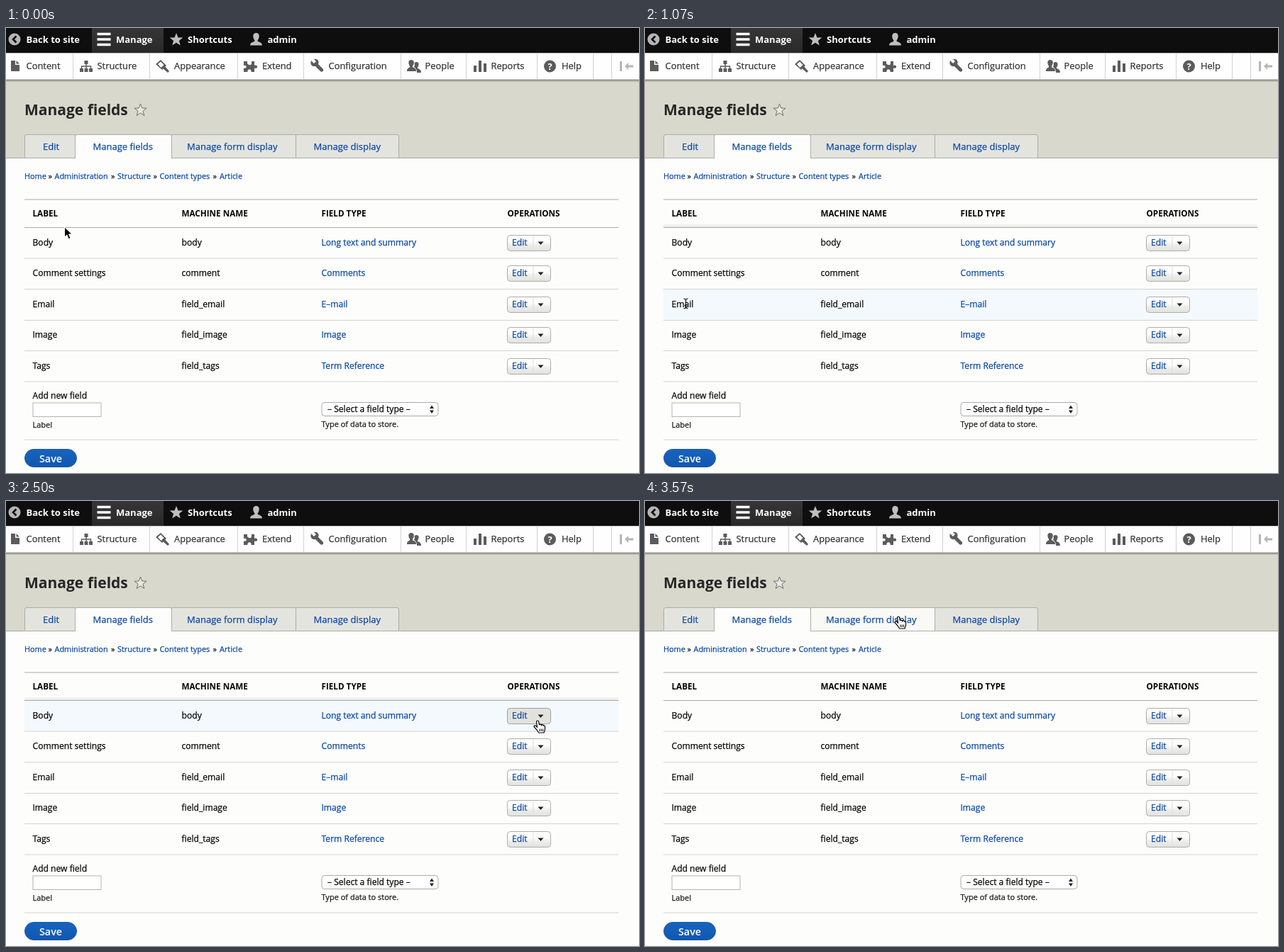
An HTML page that plays this animation: 892 by 628 pixels, repeating every 8 s.

```html
<!DOCTYPE html>
<html lang="en">
<head>
<meta charset="utf-8">
<title>Manage fields</title>
<style>
  html, body { margin: 0; width: 100%; height: 100%; overflow: hidden; background: #fdfdfc; }
  svg { display: block; width: 892px; height: 628px; }
  text {
    font: 12.1px "Open Sans", "Noto Sans", sans-serif;
    color: #060606; fill: currentColor; stroke: currentColor; stroke-width: .25px;
    white-space: pre;
  }
  .bar, .title, .head, .save { stroke: none; }
  .bar { font-size: 13px; font-weight: 700; color: #fff; }
  .tray { font-size: 12.9px; color: #333; }
  .title { font-size: 21px; font-weight: 700; color: #262626; }
  .tab { font-size: 13px; color: #0a48a3; }
  .crumb { font-size: 10.9px; color: #0a48a3; }
  .sep, .note { font-size: 11px; color: #1a1a1a; }
  .head { font-size: 11.7px; font-weight: 700; }
  .link { color: #0a48a3; }
  .save { font-size: 14.3px; font-weight: 600; color: #fff; }
  .icon { fill: #5b5b5b; }
  .button rect { fill: url(#button); stroke: #adada8; }
  .button.pale rect { stroke: #d2d2cc; }
  .button.hover rect { fill: #e3e3de; stroke: #a0a09b; }
</style>
</head>
<body>
<svg viewBox="0 0 892 628">
  <defs>
    <linearGradient id="button" x2="0" y2="1">
      <stop offset=".4" stop-color="#fdfdfc"/><stop offset=".65" stop-color="#ececea"/><stop offset="1" stop-color="#e2e2de"/>
    </linearGradient>
    <linearGradient id="active" x2="0" y2="1">
      <stop stop-color="#363636"/><stop offset="1" stop-color="#292929"/>
    </linearGradient>
    <linearGradient id="shadow" x2="0" y2="1">
      <stop stop-color="#8f8f8b"/><stop offset=".4" stop-color="#9c9c96"/><stop offset="1" stop-color="#d8d8cc"/>
    </linearGradient>
    <linearGradient id="blue" x2="0" y2="1">
      <stop stop-color="#1764bf"/><stop offset="1" stop-color="#1256b0"/>
    </linearGradient>
  </defs>

  <!-- Top bar -->
  <rect width="892" height="35.500" fill="#0e0e0e"/>
  <rect x="121" width="101" height="35" fill="url(#active)"/>
  <circle cx="12" cy="16" r="8.500" fill="#b5b5b5"/>
  <path d="M14.500 11.500 10 16l4.500 4.500" fill="none" stroke="#0e0e0e" stroke-width="2.600"/>
  <path d="M128.500 8.500h19M128.500 16h19M128.500 23.500h19" stroke="#fff" stroke-width="3.400"/>
  <path d="M0-9.500 2.500-3.100 9.300-2.900 3.900 1.400 5.800 8 0 4.200-5.800 8-3.900 1.400-9.300-2.900-2.500-3.100z" transform="translate(240 16.500)" fill="#bebebe"/>
  <path d="M352.500 7c3 0 4.400 2.200 4.200 5-.2 2.500-1 4-2 5v2c3 1 6 1.500 6.300 5.500h-17c.3-4 3.300-4.500 6.300-5.500v-2c-1-1-1.800-2.500-2-5-.2-2.800 1.200-5 4.200-5z" fill="#bebebe"/>

  <!-- Tray -->
  <rect y="35.500" width="892" height="37.500" fill="#fefefe"/>
  <rect y="75" width="892" height="108" fill="#d8d8cc"/>
  <rect y="72.500" width="892" height="4" fill="url(#shadow)"/>
  <path d="M94.500 36v36M202.500 36v36M326.500 36v36M419.500 36v36M556.500 36v36M648.500 36v36M748.500 36v36M827.500 36v36M853.500 36v36" stroke="#d2d2d2"/>
  <g class="icon">
    <path d="M7 46h6v6h6v9H7zM14.500 46l4.500 4.500h-4.500z"/>
    <path d="M110.500 46h5v5h-5zM104 57h5v5h-5zM110.500 57h5v5h-5zM117 57h5v5h-5z"/>
    <path d="M113 50v8M106.500 58v-4h13v4" fill="none" stroke="#5b5b5b" stroke-width="1.500"/>
    <path d="M211 51l7-6 8 8-6 6zM221 57l3-3 6 7-2 2z"/>
    <path d="M214 51l4-3.500 4.500 4.500-4 4z" fill="#fefefe"/>
    <path d="M335 47h5v3c2 3 6 3 6 0v-3h4v6c5-2.500 6 5.500 0 3.500v5.500h-4.500c1-5-6-5-5 0H335v-5.500c5 1.500 5-5 0-3.500z"/>
    <path d="M430 46l4 4 3-3-3-3c5-1 8 3 6 7l7 7c1 3-2 5-4 3l-7-7c-5 1-8-3-6-8z"/>
    <path d="M571 45c5 0 4.500 6 2 8.500v2c3 1 5 1.500 5 5.500h-13c0-4 2-4.500 4-5.500v-2c-2-2.500-3-8.500 2-8.500zM578 48c5 0 4 5 2 7.500v1.500c3 1 5 2 5 6h-6c0-4-1-6-4-8 1-1.500 1-4 .5-6z"/>
    <path d="M659 53h4v9h-4zM666 46h4v16h-4zM673 50h4v12h-4z"/>
    <circle cx="766.500" cy="54" r="8.500"/>
  </g>
  <text x="766.500" y="59" text-anchor="middle" class="bar">?</text>
  <path d="M865 47h3v14h-3zM872 54l5-5v3.500h7v3h-7V59z" fill="#b5b5b5"/>

  <!-- Page header -->
  <path d="M189.500 107l2.300 6 6.200.2-5 4 1.800 6.300-5.300-3.600-5.300 3.600 1.800-6.300-5-4 6.200-.2z" fill="#e8e8e0" stroke="#6f6f6a"/>
  <path d="M0 183.500h892" stroke="#a5a59f"/>
  <g stroke="#adada8" fill="#e4e4df">
    <path d="M26.500 183.500V153q0-2.500 2.500-2.500h68.500v33z"/>
    <path id="formTab" d="M233.500 150.500h175v33h-175z"/>
    <path d="M408.500 150.500H551q2.500 0 2.500 2.500v30.500h-145z"/>
    <path d="M97.500 184V153q0-2.500 2.500-2.500h131q2.500 0 2.500 2.500v31" fill="#fdfdfc"/>
  </g>

  <!-- Table -->
  <rect id="hoverRow" x="26" width="837" height="43"/>
  <rect id="headBand" x="26" y="277.500" width="837" height="3.500" fill="#efefed"/>
  <path d="M26 242h837M26 281.500h837" stroke="#aaaaa5"/>
  <path d="M26 325h837M26 368.500h837M26 412.500h837M26 455.500h837M26 499h837M26 581h837" stroke="#d4d4cd"/>
  <rect x="38" y="529" width="96" height="19.500" fill="#fff" stroke="#b4b4ae"/>
  <rect x="445" y="528.500" width="164" height="19" rx="4" fill="#fff" stroke="#aaa"/>
  <path d="M597 537l3-4.500 3 4.500zM597 539.500l3 4.500 3-4.500z" fill="#222"/>
  <rect x="26.500" y="594.500" width="73" height="25" rx="12.500" fill="url(#blue)" stroke="#1d5aa6"/>
  <g id="content"></g>

  <!-- Pointers, each with its hot spot at 0,0 -->
  <g id="arrow"><path d="M0 0v14l3.300-3 2.500 5.700 2.700-1.200-2.500-5.500h4.500z" fill="#000" stroke="#fff"/></g>
  <g id="beam"><path d="M-3-7q3 0 3 2.500V4.500Q0 7-3 7M3-7Q0-7 0-4.500V4.500Q0 7 3 7M-2 2h4" fill="none" stroke="#111" stroke-width="1.200"/></g>
  <g id="hand">
    <path d="M-1.500 1c0-2 3-2 3.200 0l.8 4.500c.5-1.500 2.800-1 3 .3.500-1.200 2.700-.8 2.800.7.800-.8 2.200 0 2.200 1.500v4l-1.500 4.500H1.500l-2-3.500-4.500-5c0-2 2-2 3.500-.3l1 .8z" fill="#fff" stroke="#000" stroke-width="1.200"/>
    <path d="M3 11v3.500M5.300 11v3.500M7.600 11v3.500" stroke="#000"/>
  </g>
</svg>
<script>
const byId = id => document.getElementById(id);

const labels = [];
const write = (cls, y, ...pairs) => {
  for (let i = 0; i < pairs.length; i += 2)
    labels.push(`<text class="${cls}" x="${pairs[i]}" y="${y}">${pairs[i + 1]}</text>`);
};

write('bar', 20.5, 28.5, 'Back to site', 155, 'Manage', 256, 'Shortcuts', 368.5, 'admin');
write('tray', 58, 28.5, 'Content', 128.5, 'Structure', 237, 'Appearance', 361, 'Extend',
  454.5, 'Configuration', 590.5, 'People', 683.5, 'Reports', 783, 'Help');
write('title', 122.5, 26, 'Manage fields');
write('tab', 172, 52, 'Edit', 122.5, 'Manage fields', 255, 'Manage form display', 433.5, 'Manage display');
write('crumb', 212.5, 26, 'Home', 68.5, 'Administration', 157, 'Structure', 216.5, 'Content types', 301, 'Article');
write('sep', 212.5, 59.5, '»', 148, '»', 207.5, '»', 291.5, '»');
write('head', 265.5, 37.5, 'LABEL', 247.5, 'MACHINE NAME', 444.5, 'FIELD TYPE', 706.5, 'OPERATIONS');

const rowTop = row => Math.floor(282 + row * 43.5);
[
  ['Body', 'body', 'Long text and summary'],
  ['Comment settings', 'comment', 'Comments'],
  ['Email', 'field_email', 'E–mail'],
  ['Image', 'field_image', 'Image'],
  ['Tags', 'field_tags', 'Term Reference']
].forEach(([label, machine, type], row) => {
  const y = rowTop(row);
  write('', y + 25, 37.5, label, 247.5, machine);
  write('link', y + 25, 444.5, type);
  labels.push(`<g class="button" transform="translate(706.5 ${y + 10.5})">
    <rect width="61" height="22" rx="4"/>
    <path d="M36.500 1v20" stroke="#deded9"/>
    <path d="M43 9h8l-4 4.500z" fill="#222"/></g>`);
  write('link', y + 25, 713, 'Edit');
});

write('', 522.5, 37.5, 'Add new field');
write('note', 564, 37.5, 'Label');
write('note', 563, 444.5, 'Type of data to store.');
write('', 542, 453, '– Select a field type –');
write('save', 612.5, 47, 'Save');
byId('content').innerHTML = labels.join('');

const buttons = [...document.querySelectorAll('.button')];
const pointers = ['arrow', 'beam', 'hand'];
const LOOP = 8000;

// start time, pointer, x, y, hovered row (-1: none)
const poses = [
  [0, 'arrow', 82.5, 281, -1],
  [350, 'arrow', 68, 312, 0],
  [710, 'beam', 57.5, 347, 1],
  [1070, 'beam', 57.5, 389, 2],
  [1420, 'arrow', 57.5, 426, 3],
  [1780, 'arrow', 372, 385, 2],
  [2140, 'arrow', 686.5, 331, 1],
  [2500, 'hand', 749, 310.5, 0],
  [2850, 'arrow', 566, 254, -1],
  [3210, 'arrow', 381.5, 191, -1],
  [3570, 'hand', 357, 163.5, -1]
];

function render(time) {
  const t = time % LOOP;
  const [, pointer, x, y, row] = poses.findLast(pose => pose[0] <= t);
  for (const id of pointers) {
    byId(id).setAttribute('transform', `translate(${x} ${y})`);
    byId(id).style.display = id === pointer ? '' : 'none';
  }
  byId('hoverRow').setAttribute('y', rowTop(Math.max(row, 0)));
  byId('hoverRow').setAttribute('fill', row < 0 ? 'none' : '#f3f9fd');
  byId('headBand').style.display = t >= 350 && t < 2850 ? '' : 'none';
  byId('formTab').setAttribute('fill', t >= 3570 ? '#f9f9f5' : '#e4e4df');
  buttons.forEach((button, i) => {
    button.classList.toggle('pale', i < 4 && t >= 1420 && t < 2500);
    button.classList.toggle('hover', i === 0 && t >= 2500 && t < 2850);
  });
}

const start = performance.now();
function tick() {
  render(performance.now() - start);
  requestAnimationFrame(tick);
}
tick();
</script>
</body>
</html>
```
